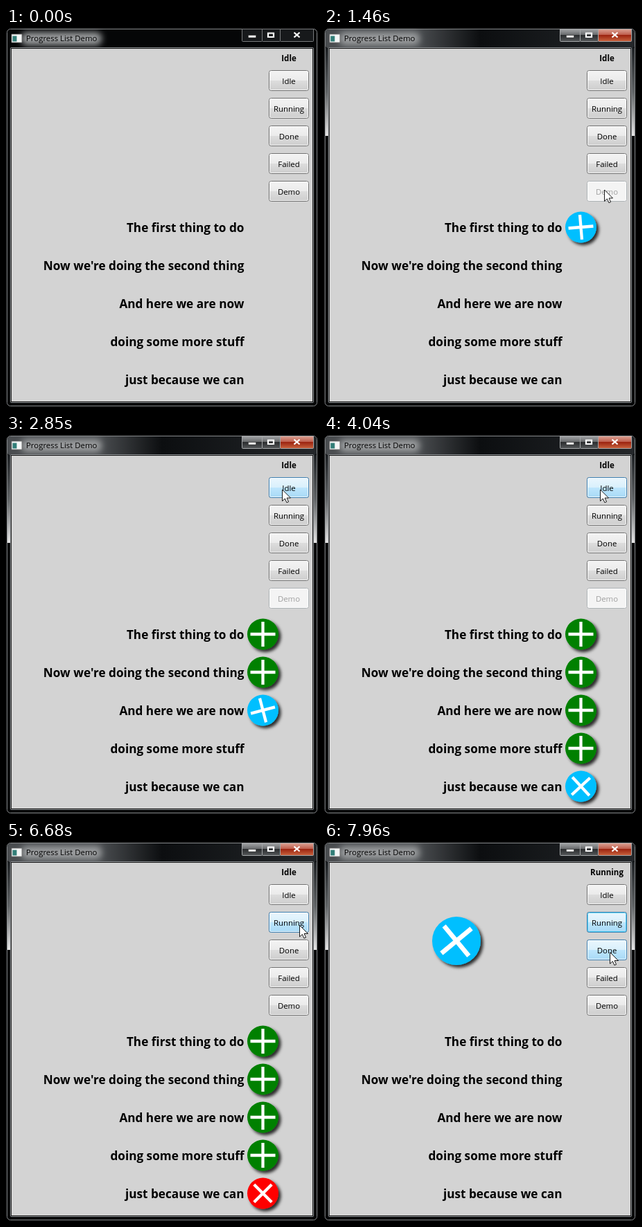
An HTML page for the animation above (8000 ms loop, 450 by 548 pixels).

```html
<!DOCTYPE html>
<html lang="en">
<meta charset="utf-8">
<title>Progress List Demo</title>
<style>
  html, body { margin: 0; width: 100%; height: 100%; overflow: hidden; background: #000; }
  svg { display: block; font: 11.4px "Open Sans", "Noto Sans", sans-serif; }
  .mid { text-anchor: middle; }
  .bold { font-weight: 700; font-size: 11.5px; }
  .task { font-weight: 700; font-size: 17.2px; text-anchor: end; }
</style>
<svg id="stage" width="450" height="548" viewBox="0 0 450 548">
  <defs>
    <linearGradient id="normal" x2="0" y2="1">
      <stop stop-color="#f3f3f3"/><stop offset=".5" stop-color="#ebebeb"/>
      <stop offset=".5" stop-color="#ddd"/><stop offset="1" stop-color="#cdcdcd"/>
    </linearGradient>
    <linearGradient id="hover" x2="0" y2="1">
      <stop stop-color="#eaf6fd"/><stop offset=".5" stop-color="#d9f0fc"/>
      <stop offset=".5" stop-color="#bee6fd"/><stop offset="1" stop-color="#a7d9f5"/>
    </linearGradient>
    <linearGradient id="glass" x2="0" y2="1">
      <stop stop-color="#a5a7a9"/><stop offset=".48" stop-color="#66686a"/>
      <stop offset=".5" stop-color="#2b2d2f"/><stop offset="1" stop-color="#55585a"/>
    </linearGradient>
    <linearGradient id="red" x2="0" y2="1">
      <stop stop-color="#dda598"/><stop offset=".48" stop-color="#bd5a48"/>
      <stop offset=".5" stop-color="#9c2410"/><stop offset="1" stop-color="#c9643f"/>
    </linearGradient>
    <linearGradient id="bar" x2="1" y2="0">
      <stop stop-color="#4a4d50"/><stop offset=".3" stop-color="#4a4d50"/>
      <stop offset=".5" stop-color="#0c0e10"/><stop offset="1" stop-color="#24272a"/>
    </linearGradient>
    <linearGradient id="shine" x2="0" y2="1">
      <stop stop-color="#1d2023"/><stop offset=".5" stop-color="#606365"/>
      <stop offset="1" stop-color="#e4e4e4"/>
    </linearGradient>
    <filter id="blur" x="-30%" y="-80%" width="160%" height="260%"><feGaussianBlur stdDeviation="5"/></filter>
    <filter id="shadow" x="-30%" y="-30%" width="170%" height="170%">
      <feDropShadow dx="3.5" dy="3.5" stdDeviation="1.9" flood-opacity=".8"/>
    </filter>
  </defs>

  <rect x="1.500" y="1.500" width="447" height="545" rx="5" fill="#050607" stroke="#85888a"/>
  <g id="active">
    <rect x="2" y="2" width="446" height="27" rx="4" fill="url(#bar)"/>
    <path d="M2 29h4v127H2zM444 29h4v127h-4z" fill="url(#shine)"/>
  </g>
  <rect x="22" y="6" width="116" height="19" rx="8" fill="#9a9c9e" filter="url(#blur)"/>
  <g id="captions"></g>
  <path d="M349.500 10.500h11v3.500h-11z" fill="#fff" stroke="#333" stroke-width=".6"/>
  <path d="M378 7.500h8v5.500h-8z" fill="none" stroke="#fff" stroke-width="2.200"/>
  <path d="M415.500 6.500l8 7m0-7l-8 7" stroke="#fff" stroke-width="2.300"/>
  <path d="M8 9h15v12H8z" fill="#f4f6f6" stroke="#777" stroke-width=".8"/>
  <path d="M9.500 11.500h6v8h-6z" fill="#327e78"/>
  <text x="29" y="19">Progress List Demo</text>

  <rect x="6.500" y="28.500" width="437" height="513" rx="1" fill="#111" stroke="#95999c"/>
  <rect x="8" y="30" width="434" height="510" fill="#d3d3d3"/>
  <text id="status" class="mid bold" x="408" y="48"></text>
  <g id="buttons"></g>
  <g id="tasks"></g>
  <g id="icons"></g>
  <path id="cursor" d="M0 0V16.500L3.900 13 6.400 18.700 9 17.600 6.600 12H12z" fill="#fff" stroke="#000" stroke-width=".9"/>
</svg>
<script>
const LOOP = 8000, SPIN = 0.33, ACTIVATED = 780, DEMO_START = 930, DEMO_END = 6680, RUN_CLICK = 6990;
const BLUE = [0, 191, 255], GREEN = [0, 128, 0], RED = [255, 0, 0];

const $ = id => document.getElementById(id);
const clamp = v => Math.min(1, Math.max(0, v));
const ramp = (t, from, length) => clamp((t - from) / length);
const backOut = p => 1 + 2.7 * (p - 1) ** 3 + 1.7 * (p - 1) ** 2;

// Colours blend in linear light.
const mix = (a, b, p) => `rgb(${a.map((v, i) =>
  Math.round(255 * ((v / 255) ** 2.2 * (1 - p) + (b[i] / 255) ** 2.2 * p) ** (1 / 2.2)))})`;

function add(parent, markup) {
  $(parent).insertAdjacentHTML('beforeend', markup);
  return $(parent).lastElementChild;
}

const captions = [[340, 29], [369, 26], [395, 48]].map(([x, w]) =>
  add('captions', `<path d="M${x + .5} 1.500H${x + w + .5}V18.500q0 1-1 1H${x + 1.5}q-1 0-1-1z"/>`));

// Each hover interval is [enter, leave].
const buttons = [
  ['Idle', 2060, 4800], ['Running', 5110, LOOP], ['Done', 7450, LOOP], ['Failed', LOOP, LOOP], ['Demo', ACTIVATED, DEMO_START]
].map(([label, enter, leave], i) => {
  const box = (inset, more) =>
    `<rect x="${379.5 + inset}" y="${61.5 + 40 * i + inset}" width="${57 - 2 * inset}" height="${29 - 2 * inset}" rx="${3 - inset}" ${more}/>`;
  const node = add('buttons', `<g>${box(0, 'fill="url(#normal)" stroke="#707070"')}
    ${box(0, 'fill="url(#hover)" stroke="#3c7fb1"')}
    ${box(1, 'fill="none" stroke="#fff" stroke-opacity=".8"')}
    <text class="mid" x="408" y="${81 + 40 * i}">${label}</text></g>`);
  const [base, hover, inner, text] = node.children;
  return { label, enter, leave, base, hover, inner, text };
});

['The first thing to do', "Now we're doing the second thing", 'And here we are now',
  'doing some more stuff', 'just because we can'].forEach((line, i) =>
  add('tasks', `<text class="task" x="343.500" y="${295 + 55 * i}">${line}</text>`));

function makeIcon(x, y, r, start, end, failed) {
  const arm = r * 0.8;
  const node = add('icons', `<g><circle r="${r}" filter="url(#shadow)"/>
    <path d="M${-arm} 0H${arm}M0 ${-arm}V${arm}" stroke="#fff" stroke-width="${r * 0.19}"/></g>`);
  return { x, y, start, end, failed, node, disc: node.children[0], cross: node.children[1] };
}

const starts = [DEMO_START, 1680, 2350, 2855, 3080, 4780];
const icons = starts.slice(0, 5).map((start, i) =>
  makeIcon(370.5, 288 + 55 * i, 22.5, start, starts[i + 1], i === 4));
const bigIcon = makeIcon(191, 143, 35, RUN_CLICK, LOOP, false);

// Cursor tip as time, x, y.
const track = [
  [110, 440, 270], [400, 399, 241], [610, 404.5, 234], [1640, 404.5, 234], [2040, 401, 86],
  [2190, 398.5, 79], [4500, 398.5, 79], [4810, 408.5, 99], [5140, 413, 111],
  [5350, 420, 115], [5630, 423.5, 120.5], [7180, 423.5, 120.5], [7560, 412.5, 159.5], [LOOP, 412.5, 159.5]
];

function drawCursor(t) {
  const next = track.findIndex(key => key[0] > t);
  $('cursor').setAttribute('visibility', next > 0 ? 'visible' : 'hidden');
  if (next < 1) return;
  const a = track[next - 1], b = track[next], p = (t - a[0]) / (b[0] - a[0]);
  $('cursor').setAttribute('transform', `translate(${a[1] + (b[1] - a[1]) * p} ${a[2] + (b[2] - a[2]) * p})`);
}

function drawIcon(icon, t, opacity) {
  const { x, y, start, end, failed, node, disc, cross } = icon;
  const shown = t >= start && opacity > 0;
  node.setAttribute('visibility', shown ? 'visible' : 'hidden');
  if (!shown) return;
  const settle = ramp(t, end, 400), rest = failed ? 45 : 0;
  let angle = (Math.min(t, end) - start) * SPIN;
  angle += (Math.ceil((angle - rest) / 90) * 90 + rest - angle) * settle;
  node.setAttribute('transform', `translate(${x} ${y}) scale(${backOut(ramp(t, start, 250))})`);
  node.setAttribute('opacity', opacity);
  disc.setAttribute('fill', mix(BLUE, failed ? RED : GREEN, settle));
  cross.setAttribute('transform', `rotate(${angle})`);
}

function drawButton(b, t) {
  const disabled = b.label === 'Demo' && t >= DEMO_START && t < DEMO_END;
  const focused = b.label === 'Running' && t >= RUN_CLICK;
  const hover = ramp(t, b.enter, 250) * (1 - ramp(t, b.leave, 450));
  b.base.setAttribute('fill', disabled ? '#f4f4f4' : 'url(#normal)');
  b.base.setAttribute('stroke', disabled ? '#adb2b5' : '#707070');
  b.hover.setAttribute('opacity', disabled ? 0 : hover);
  b.inner.setAttribute('stroke', focused ? '#35c8f2' : '#fff');
  b.text.setAttribute('fill', disabled ? '#a0a0a0' : '#000');
}

function draw(t) {
  const active = t >= ACTIVATED;
  $('active').setAttribute('visibility', active ? 'visible' : 'hidden');
  $('captions').setAttribute('stroke', active ? '#a4a7a9' : '#77797b');
  captions.forEach((c, i) => c.setAttribute('fill', !active ? '#17191b' : i === 2 ? 'url(#red)' : 'url(#glass)'));
  $('status').textContent = t < RUN_CLICK ? 'Idle' : 'Running';
  buttons.forEach(b => drawButton(b, t));
  icons.forEach(icon => drawIcon(icon, t, 1 - ramp(t, 6700, 100)));
  drawIcon(bigIcon, t, 1);
  drawCursor(t);
}

function tick() {
  draw(performance.now() % LOOP);
  requestAnimationFrame(tick);
}
tick();
</script>
</html>
```
